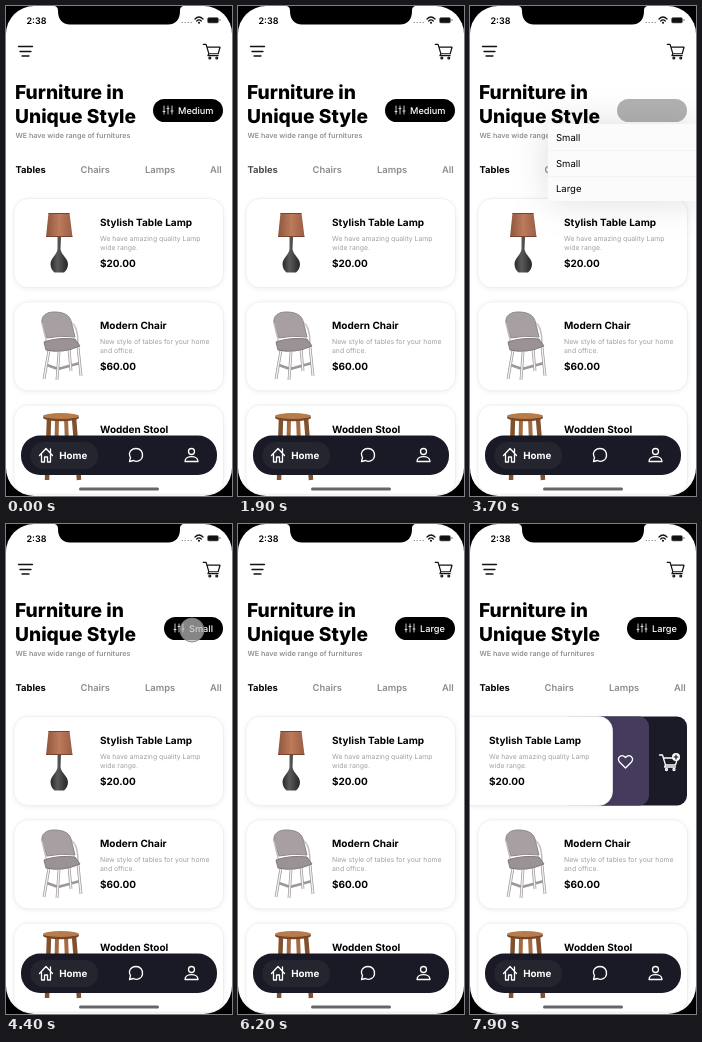
These frames come from a looping animation (226x490 px, 8000 ms). An HTML page:

```html
<!DOCTYPE html>
<html lang="en">
<head>
<meta charset="utf-8">
<title>Furniture shop</title>
<style>
html, body { margin: 0; width: 100%; height: 100%; overflow: hidden; background: #000; }
svg { display: block; width: 226px; height: 490px; font-family: Inter, "Liberation Sans", sans-serif; }
text { white-space: pre; text-rendering: geometricPrecision; }
.line { fill: none; stroke: #111; stroke-width: 1.3; stroke-linecap: round; stroke-linejoin: round; }
.white { stroke: #fff; }
.title { font-size: 10px; font-weight: 700; }
.note { font-size: 6.85px; fill: #a0a0a0; }
.tab { font-size: 9.4px; font-weight: 600; fill: #8c8c8c; }
.card { fill: #fff; stroke: #ececec; stroke-width: .8; filter: drop-shadow(0 1px 2px #0001); }
.menu { filter: drop-shadow(0 0 18px #0002); }
</style>
</head>
<body>
<svg viewBox="0 0 226 490">
  <defs>
    <clipPath id="screen"><rect width="226" height="490" rx="28"/></clipPath>
    <linearGradient id="shade" x2="1">
      <stop stop-color="#8f553f"/><stop offset=".5" stop-color="#bd7b5b"/><stop offset="1" stop-color="#9a5d45"/>
    </linearGradient>
    <linearGradient id="vase" x2="1">
      <stop stop-color="#29292a"/><stop offset=".4" stop-color="#5b5958"/><stop offset="1" stop-color="#272727"/>
    </linearGradient>
    <g id="cart">
      <path d="M0 1h3l3 10h10l2-7H4.2M6 11l-1 2h11"/>
      <circle cx="7" cy="15.5" r="1"/><circle cx="14.5" cy="15.5" r="1"/>
    </g>
    <g id="lamp">
      <path fill="url(#vase)" d="M51.500 231h3.500l-.5 12c.5 6 7.500 9 7.500 15 0 4-2 7-4 8.500h-9.500c-2-1.500-4-4.500-4-8.500 0-6 6.500-9 7-15z"/>
      <path fill="url(#shade)" d="M42.500 207h21l3 24h-26.500z"/>
      <path fill="none" stroke="#7a432f" d="M42.500 207.500h21M40 230.500h26.300"/>
    </g>
    <g id="chair" transform="translate(0 -103.300)" fill="none" stroke-linejoin="round">
      <path id="legs" stroke="#9c9898" stroke-width="2.800" d="M43 344l-5 29M53 346l-2 28M72 341l3 29M63 343l2 22M41 359l11 4 22-6"/>
      <path stroke="#f4f1f0" stroke-width="1.400" d="M43 344l-5 29M53 346l-2 28M72 341l3 29M63 343l2 22"/>
      <path fill="#a79fa1" stroke="#8d8688" d="M41 332l-5-15c-1-7 4-11 12-11s15 2 17 9l4 16q-14-2-28 1z"/>
      <path stroke="#c3bcbc" stroke-width="1.400" d="M36 317l5 21M66 317q6 4 6 21"/>
      <path fill="#9a9295" stroke="#7f797c" d="M38 336q14-5 31-3l5 7q-18 8-34 4z"/>
    </g>
    <g id="stool" transform="translate(0 -206.600)" fill="none">
      <path stroke="#81502f" stroke-width="4.500" d="M43 412l-2 62M68 412l5 62"/>
      <path stroke="#a46b41" stroke-width="4" d="M51 412l-1 50M60 412l2 50"/>
      <ellipse cx="55" cy="411.500" rx="18" ry="3.800" fill="#74452a"/>
      <ellipse cx="55" cy="410" rx="18" ry="3" fill="#b87c4b"/>
    </g>
  </defs>
  <rect width="226" height="490"/>
  <g clip-path="url(#screen)">
    <rect width="226" height="490" fill="#fff"/>

    <path class="line" d="M12.500 40.500h14M14 45.500h11M16 50h7"/>
    <use href="#cart" class="line" transform="translate(197.300 37.500) scale(.93)"/>
    <g font-size="19.200" font-weight="800"><text x="9" y="93">Furniture in</text><text x="9" y="117">Unique Style</text></g>
    <text x="9.500" y="132" font-size="7.150" font-weight="600" fill="#909090">WE have wide range of furnitures</text>
    <text id="tables" class="tab" x="9.500" y="167" style="font-weight:700;fill:#000">Tables</text>
    <text class="tab" x="74.500" y="167">Chairs</text>
    <text class="tab" x="139" y="167">Lamps</text>
    <text class="tab" x="204" y="167">All</text>

    <rect id="pill" y="93" height="23" rx="11.500"/>
    <g id="face">
      <path class="line white" style="stroke-width:.8" d="M1 100v8M5 100v8M9 100v8M0 105.500h2M4 102.500h2M8 105h2"/>
      <text id="size" x="15" y="108" font-size="9.200" font-weight="500" fill="#fff"></text>
    </g>

    <g id="actions">
      <rect x="100" y="192.500" width="117" height="89" rx="10" fill="#1a1b27"/>
      <rect x="90" y="192.500" width="89" height="89" rx="10" fill="#453c5d"/>
      <path class="line white" d="M155.500 244l-6-6c-3-4 2-9 6-4.500 4-4.500 9 .5 6 4.500z"/>
      <use href="#cart" class="line white" x="189.500" y="230"/>
      <circle cx="206" cy="233" r="4" fill="#fff"/>
      <path class="line" style="stroke-width:1.200" d="M204 233h4M206 231v4"/>
    </g>
    <g id="cards"></g>

    <g id="menu">
      <rect class="menu" x="78" y="118" width="152" height="77" fill="#fbfbfb"/>
      <path stroke="#f3f3f3" d="M78 144.500h148M78 170.500h148"/>
      <g font-size="9.500"><text x="86" y="135">Small</text><text x="86" y="160.500">Small</text><text x="86" y="186">Large</text></g>
    </g>

    <rect x="15" y="429.500" width="196" height="39.500" rx="19" fill="#191a25"/>
    <rect x="24.500" y="436" width="67.500" height="27" rx="13" fill="#24252f"/>
    <path class="line white" d="M33.500 449.500l6.500-7 6.500 7M35.500 448v8h3v-5h3v5h3v-8M44.500 443v3"/>
    <text x="53.300" y="453" font-size="9.800" font-weight="700" fill="#fff">Home</text>
    <path class="line white" d="M123.500 455.500l1-4c-3-5 1-9 5.500-9s7 3.500 6.500 7.500c-.5 4.500-5.500 6.500-9 4.500z"/>
    <circle class="line white" cx="185.500" cy="445.500" r="3"/>
    <path class="line white" d="M179 455.500c0-6.500 13-6.500 13 0z"/>
    <rect x="73" y="481.500" width="80" height="3" rx="1.500" fill="#666"/>

    <path d="M47 0c4 0 5 2 5 5 0 8 4 13.500 12 13.500h98c8 0 12-5.500 12-13.500 0-3 1-5 5-5z"/>
    <text x="20.500" y="17.500" font-size="9" font-weight="600">2:38</text>
    <path stroke="#999" stroke-dasharray="1.500 1.500" d="M175.500 16.500h10.500"/>
    <path class="line" d="M189 13q4-4 8 0M190.700 15q2.300-2.300 4.600 0"/><circle cx="193" cy="16.700" r="1"/>
    <rect x="201.500" y="11.500" width="11" height="5.500" rx="1.500" fill="#111" stroke="#777" stroke-width=".6"/>
    <path stroke="#777" d="M214 13v2"/>
  </g>
  <circle id="touch" r="12" fill="#bdbdbd" fill-opacity=".7" stroke="#777" stroke-width=".8"/>
</svg>
<script>
const $ = id => document.getElementById(id);
const clamp = v => Math.min(1, Math.max(0, v));
const ramp = (t, from, to) => clamp((t - from) / (to - from));
const ease = v => v * v * (3 - 2 * v);
const span = (t, from, to, fade) => ramp(t, from, from + fade) * (1 - ramp(t, to - fade, to));

const goods = [
  ["lamp", "Stylish Table Lamp", "We have amazing quality Lamp", "wide range.", "$20.00"],
  ["chair", "Modern Chair", "New style of tables for your home", "and office.", "$60.00"],
  ["stool", "Wodden Stool", "", "", ""]
];
$("cards").innerHTML = goods.map(([art, name, first, second, price], i) => `
  <g transform="translate(0 ${i * 103.3})"><g>
    <rect class="card" x="8" y="192.500" width="209.500" height="89" rx="14"/>
    <use href="#${art}"/>
    <text class="title" x="94" y="220">${name}</text>
    <text class="note" x="94" y="235">${first}</text>
    <text class="note" x="94" y="244">${second}</text>
    <text class="title" x="94" y="261">${price}</text>
  </g></g>`).join("");
const firstCard = $("cards").querySelector("g g");

const widths = { Medium: 70, Small: 59, Large: 60 };
// start, end, x, y
const taps = [
  [2750, 3050, 186, 106], [3740, 3980, 100, 157],
  [4300, 4600, 186, 106], [5300, 5700, 108, 179], [6350, 7300, 104, 245]
];

function draw(t) {
  const size = t < 3950 ? "Medium" : t < 5750 ? "Small" : "Large";
  const left = 217 - widths[size];
  $("size").textContent = size;
  $("pill").setAttribute("x", left);
  $("pill").setAttribute("width", widths[size]);
  $("face").setAttribute("transform", `translate(${left + 10} 0)`);

  const open = span(t, 2900, 4150, 250) + span(t, 4500, 6000, 250);
  $("menu").setAttribute("opacity", open);
  $("pill").setAttribute("opacity", 1 - .7 * open);
  $("face").setAttribute("opacity", 1 - open);
  $("tables").setAttribute("opacity", 1 - .3 * span(t, 1700, 2150, 150));

  const drag = -88 * ease(ramp(t, 6450, 6980));
  const slide = drag + 13 * ease(ramp(t, 7250, 7550));
  firstCard.setAttribute("transform", `translate(${slide} 0)`);
  $("actions").style.display = slide ? "" : "none";

  const tap = taps.find(([from, to]) => t >= from && t < to);
  $("touch").style.display = tap ? "" : "none";
  if (tap) {
    const [from, to, x, y] = tap;
    $("touch").setAttribute("cx", x + drag);
    $("touch").setAttribute("cy", y);
    $("touch").setAttribute("opacity", span(t, from, to, 80));
  }
}

const start = performance.now();
function tick() {
  draw((performance.now() - start) % 8000);
  requestAnimationFrame(tick);
}
tick();
</script>
</body>
</html>
```
